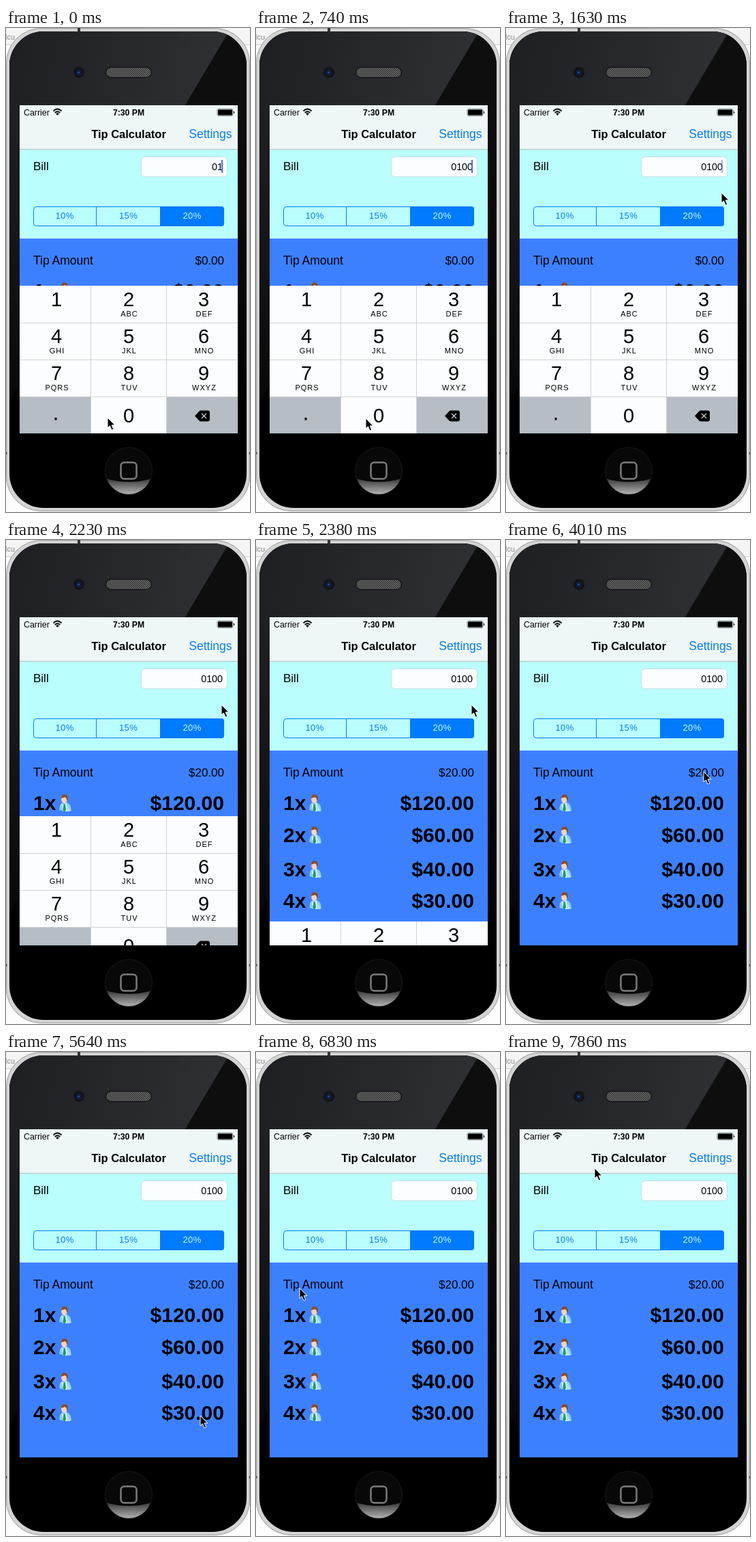
Write an HTML page that moves like this. It is 358x708 px and loops after 8000 ms.

```html
<!DOCTYPE html>
<html lang="en">
<head>
<meta charset="utf-8">
<title>Tip Calculator</title>
<style>
  html, body { margin: 0; width: 100%; height: 100%; overflow: hidden; background: #fff; }
  svg { display: block; width: 358px; height: 708px; font: 17px "Liberation Sans", Arial, sans-serif; }
  .end { text-anchor: end; }
  .mid { text-anchor: middle; }
  .bold { font-weight: bold; }
  .big { font-size: 30px; font-weight: bold; }
  .seg { font-size: 13px; letter-spacing: .4px; fill: #087cf5; }
  .digit { font-size: 29px; }
  .abc { font-size: 11px; letter-spacing: 1px; }
</style>
</head>
<body>
<svg viewBox="0 0 358 708">
  <defs>
    <clipPath id="screen"><rect x="20" y="113" width="320" height="480"/></clipPath>
    <clipPath id="body"><rect x="5" y="5" width="348" height="697" rx="50"/></clipPath>
    <clipPath id="home"><circle cx="180" cy="648" r="34"/></clipPath>
    <linearGradient id="gloss" gradientUnits="userSpaceOnUse" x1="5" y1="0" x2="320" y2="60">
      <stop offset="0" stop-color="#1e1f23"/><stop offset="1" stop-color="#2f3034"/>
    </linearGradient>
    <linearGradient id="fade" x1="0" y1="0" x2="0" y2="1">
      <stop offset="0" stop-color="#000" stop-opacity="0"/><stop offset="1" stop-color="#000" stop-opacity=".8"/>
    </linearGradient>
    <linearGradient id="shine" x1="0" y1="0" x2="0" y2="1">
      <stop offset="0" stop-color="#2c2c2c"/><stop offset=".7" stop-color="#a8a8a8"/>
    </linearGradient>
    <pattern id="mesh" width="3" height="3" patternUnits="userSpaceOnUse">
      <rect width="3" height="3" fill="#6f6f6f"/>
      <circle cx=".75" cy=".75" r=".85" fill="#2a2a2a"/><circle cx="2.25" cy="2.25" r=".85" fill="#2a2a2a"/>
    </pattern>
    <g id="person">
      <path d="M1.500 23Q1 14 6 12.500L12 12Q18 13 19 24Q10 26 1.500 23Z" fill="#8fcbee"/>
      <path d="M4.500 13L8 16L12 12L12.500 25H7Z" fill="#e4f4fb"/>
      <path d="M7.500 14.500h2.500l1 8l-1.500 2.500h-2l-1-2.500z" fill="#1c9a5c"/>
      <path d="M13 16l5 8.500l-5 .5z" fill="#b5dff5"/>
      <ellipse cx="8.500" cy="7.500" rx="4.300" ry="5.500" fill="#f6d3b3"/>
      <path d="M4 5.500Q4 .3 9 .3Q14.500 .5 13.800 7.500L12.300 10Q12.500 5.500 9.500 4Q7 5.200 4 5.500Z" fill="#8a4b22"/>
    </g>
  </defs>

  <!-- desktop -->
  <rect width="358" height="708" fill="#fdfdfd"/>
  <rect width="358" height="24" fill="#f5f5f5"/>
  <path d="M0 24.500H358" stroke="#c9c9c9"/>
  <text x="-7" y="17" font-size="11" fill="#888">alcu</text>

  <!-- phone -->
  <rect x=".5" y=".5" width="357" height="706" rx="51" fill="#d4d4d4" stroke="#9a9a9a"/>
  <rect x="5" y="5" width="348" height="697" rx="50"/>
  <path d="M0 622H1.500M356.500 622H358" stroke="#444" stroke-width="3"/>
  <rect x="105" width="4" height="5" fill="#333"/>
  <g clip-path="url(#body)">
    <rect x="5" y="5" width="348" height="540" fill="#0e0e0f"/>
    <path d="M5 5H327L5 545Z" fill="url(#gloss)"/>
    <rect x="5" y="113" width="348" height="432" fill="url(#fade)"/>
  </g>
  <circle cx="107" cy="65" r="8.500" fill="#121319" stroke="#24252a"/>
  <circle cx="107" cy="65" r="4.500" fill="#111c3c"/>
  <circle cx="106.500" cy="65" r="1.600" fill="#24459a"/>
  <rect x="146.500" y="57.500" width="67" height="15" rx="7.500" fill="url(#mesh)" stroke="#141414" stroke-width="1.500"/>
  <circle cx="180" cy="648" r="34.500" fill="#080808" stroke="#191919"/>
  <path d="M140 657Q180 671 220 657V690H140Z" fill="url(#shine)" clip-path="url(#home)"/>
  <rect x="168.500" y="635.500" width="23" height="24" rx="5" fill="#060606" stroke="#7c7c7c" stroke-width="2.500"/>

  <g clip-path="url(#screen)">
    <rect x="20" y="113" width="320" height="65" fill="#eef6f7"/>
    <rect x="20" y="178" width="320" height="130" fill="#bafffd"/>
    <rect x="20" y="308" width="320" height="285" fill="#3d80ff"/>
    <path d="M20 177.500H340" stroke="#aebfc1"/>

    <!-- status and title -->
    <text x="26" y="128" font-size="12.400">Carrier</text>
    <path d="M69.500 121.500Q75.500 115.500 81.500 121.500M71.800 124Q75.500 120.500 79.200 124" fill="none" stroke="#000" stroke-width="1.800"/>
    <path d="M73.300 125.300Q75.500 123.300 77.700 125.300L75.500 128Z"/>
    <text x="180" y="128" class="mid bold" font-size="12.200">7:30 PM</text>
    <rect x="310" y="118.500" width="23" height="10" rx="2" fill="#dde4e5" stroke="#555" stroke-width=".7"/>
    <rect x="311" y="119.500" width="21" height="8" rx="1"/>
    <path d="M334 121.500q2.500 2 0 4z"/>
    <text x="180" y="161" class="mid bold" font-size="16.500">Tip Calculator</text>
    <text x="331.500" y="161" class="end" font-size="17.500" fill="#087cff">Settings</text>

    <!-- bill -->
    <text x="40" y="208">Bill</text>
    <rect x="198.500" y="188.500" width="126" height="29" rx="5" fill="#fafefe" stroke="#cbdedf"/>
    <text id="bill" x="318" y="208" class="end" font-size="14.300"></text>
    <rect id="caret" x="316" y="193" width="2" height="19" fill="#426bf2"/>

    <rect x="40.500" y="261.500" width="279" height="28" rx="4" fill="none" stroke="#087cff"/>
    <path d="M226 261H316a4 4 0 0 1 4 4V286a4 4 0 0 1-4 4H226Z" fill="#007aff"/>
    <path d="M132.500 261V290" stroke="#087cff"/>
    <text x="86" y="279" class="seg mid">10%</text>
    <text x="179.500" y="279" class="seg mid">15%</text>
    <text x="273" y="279" class="seg mid" style="fill:#bafffd">20%</text>

    <text x="40" y="346" font-size="17.500">Tip Amount</text>
    <text id="tip" x="320" y="346" class="end"></text>
    <g id="rows"></g>
    <g id="pad"></g>
  </g>

  <path id="mouse" d="M0 0V15L3.400 11.900L6 18L8.700 16.900L6.100 10.900H10.800Z" stroke="#fff" stroke-linejoin="round"/>
</svg>
<script>
const $ = id => document.getElementById(id);
const LOOP = 8000, STEP = 148.4;
const money = v => '$' + v.toFixed(2);

// split table: one row per party size
$('rows').innerHTML = [395, 442, 492, 538].map((y, i) =>
  `<text x="40" y="${y}" class="big">${i + 1}x</text>
   <use href="#person" x="77" y="${y - 23}"/>
   <text x="320" y="${y}" class="big end share"></text>`).join('');
const shares = document.querySelectorAll('.share');

// number pad
const letters = ['', 'ABC', 'DEF', 'GHI', 'JKL', 'MNO', 'PQRS', 'TUV', 'WXYZ'];
const colX = [74, 180, 290];
$('pad').innerHTML = `
  <rect x="20" y="377" width="320" height="216" fill="#fcfdfe"/>
  <rect id="zero" x="125" y="540" width="110" height="53" fill="#b6bdc4"/>
  <path d="M20 539H124.500V593H20ZM235 539H340V593H235Z" fill="#b6bdc4"/>
  <path d="M20 431.500H340M20 485.500H340M20 539.500H340M124.500 377V593M235.500 377V593" stroke="#cfd3d7" fill="none"/>` +
  letters.map((s, i) => {
    const x = colX[i % 3], y = 407 + 54 * Math.floor(i / 3);
    return `<text x="${x}" y="${y}" class="digit mid">${i + 1}</text>
      <text x="${x + 1}" y="${y + 15}" class="abc mid">${s}</text>`;
  }).join('') + `
  <text x="180" y="577" class="digit mid">0</text>
  <rect x="71.500" y="570" width="3" height="3.500"/>
  <path d="M277 567.500L283.500 560.500Q284.500 559.500 286 559.500H296Q299 559.500 299 562.500V572.500Q299 575.500 296 575.500H286Q284.500 575.500 283.500 574.500Z"/>
  <path d="M287 564l7 7m0-7l-7 7" stroke="#cbd0d5" stroke-width="1.300"/>`;

// pointer path: step, x, y
const path = [
  [0, 149, 570], [2, 154, 571], [5, 161, 571], [6, 200, 480], [7, 262, 330], [8, 302, 258], [9, 316, 241],
  [20, 316, 241], [22, 298, 275], [24, 274, 336], [25, 271, 350], [27, 290, 339],
  [28, 290, 339], [30, 268, 372], [32, 244, 394], [34, 247, 428], [36, 255, 459],
  [38, 285, 532], [40, 277, 544], [41, 277, 544], [43, 205, 430], [45, 85, 281],
  [47, 43, 410], [49, 54, 542], [50, 60, 545], [51, 75, 460], [53, 130, 170]
];

function pointer(k) {
  const i = Math.max(1, path.findIndex(p => p[0] >= k));
  const [a, x0, y0] = path[i - 1], [b, x1, y1] = path[i];
  const u = (k - a) / (b - a);
  return [x0 + (x1 - x0) * u, y0 + (y1 - y0) * u];
}

function draw(t) {
  const k = Math.min(53, Math.floor((t + 5) / STEP));
  const done = k >= 15, total = done ? 120 : 0;

  $('bill').textContent = k < 2 ? '01' : k < 4 ? '010' : '0100';
  $('caret').setAttribute('opacity', done || k === 9 || k === 10 ? 0 : k === 11 ? .5 : 1);
  $('zero').setAttribute('opacity', k === 1 || k === 3 ? 1 : 0);
  $('tip').textContent = money(total / 6);
  shares.forEach((el, i) => el.textContent = money(total / (i + 1)));

  const drop = done ? [27, 181, 212][k - 15] ?? 216 : 0;
  $('pad').setAttribute('transform', `translate(0 ${drop})`);
  $('mouse').setAttribute('transform', `translate(${pointer(k).join(' ')})`);
}

const start = performance.now();
function tick() {
  draw((performance.now() - start) % LOOP);
  requestAnimationFrame(tick);
}
tick();
</script>
</body>
</html>
```
